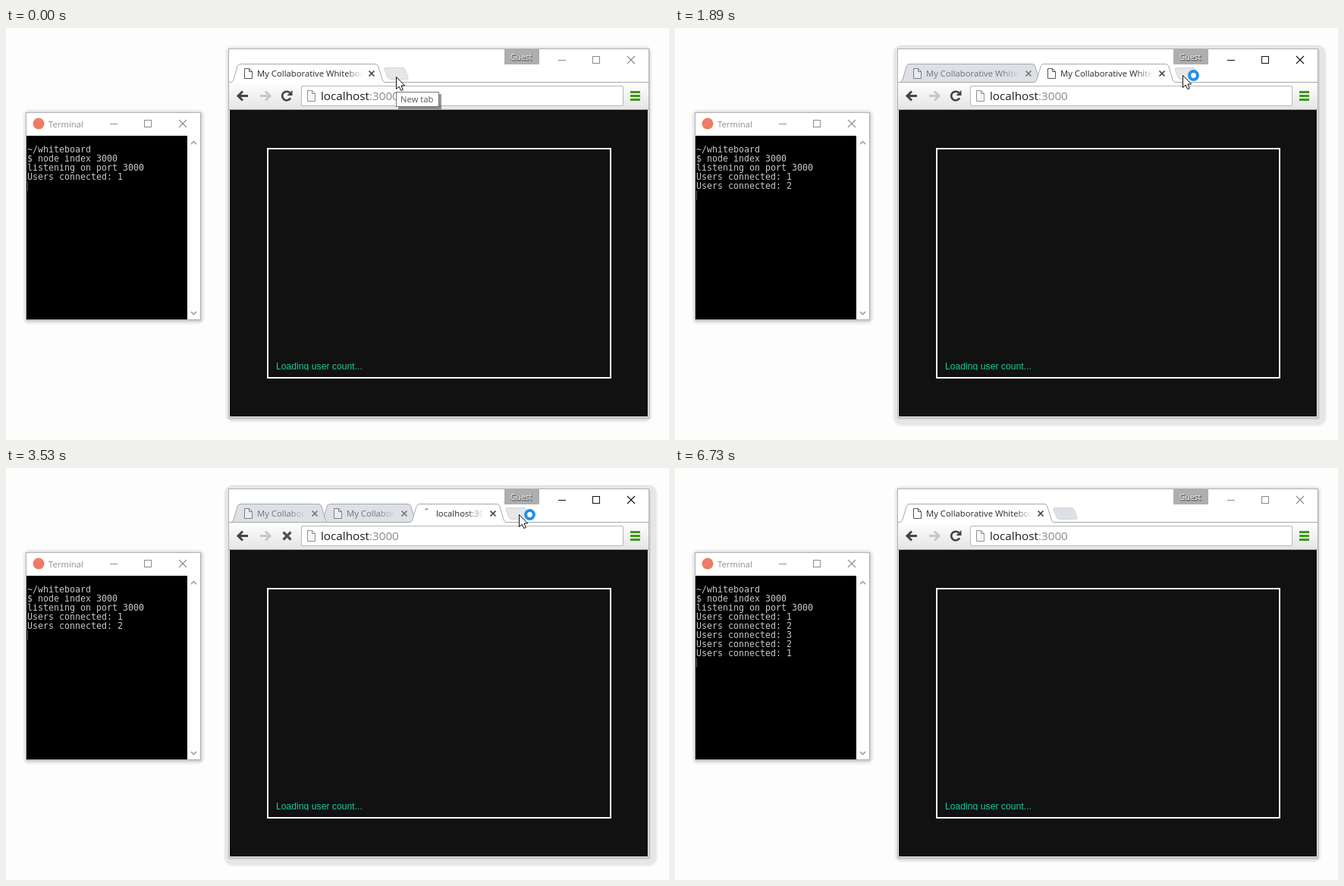
Recreate the animation shown at these times as an HTML page with a canvas. Size 874x543 px, loop 6.75 s.

```html
<!DOCTYPE html>
<html lang="en">
<head>
<meta charset="utf-8">
<title>Collaborative whiteboard demo</title>
<style>
html, body { margin: 0; width: 100%; height: 100%; overflow: hidden; background: #fdfdfd; }
canvas { display: block; }
</style>
</head>
<body>
<canvas width="874" height="543"></canvas>
<script>
const c = document.querySelector('canvas').getContext('2d');
const LOOP = 6750;
const SANS = '"Open Sans", "Noto Sans", sans-serif';
const MONO = '"DejaVu Sans Mono", monospace';
const ARIAL = '"Liberation Sans", Arial, sans-serif';
const PAGE_TITLE = 'My Collaborative Whiteboard';

// Moments of the story, in ms
const OPEN_2 = 310, URL_2 = 760, GO_2 = 1390, DONE_2 = 1600;
const OPEN_3 = 2310, URL_3 = 2750, GO_3 = 3380, DONE_3 = 3600;
const CLOSE_3 = 4520, CLOSE_2 = 5700, BLUR = 6730, SLIDE = 220;

// Left and right edge of three tabs, then the new-tab button
const ONE = [296, 500, 489, 500, 489, 500, 499];
const TWO = [296, 484, 473, 660, 649, 660, 659];
const THREE = [296, 425, 414, 543, 532, 660, 659];
const LAYOUTS = [[OPEN_2, TWO], [OPEN_3, THREE], [CLOSE_3, TWO], [CLOSE_2, ONE]];

// Pointer path: time, x, y
const PATH = [
  [330, 514, 64], [820, 631, 75], [1480, 631, 75], [1860, 669, 62], [1890, 669, 62],
  [2030, 676, 61], [3640, 676, 61], [3980, 668, 58], [4070, 668, 58], [4370, 643, 58],
  [4540, 643, 58], [4770, 613, 57], [5180, 647, 58], [5330, 647, 58], [5390, 646, 57],
  [5780, 646, 57], [6370, 805, 503], [6400, 805, 504], [6450, 819, 545]
];

// Lines added to the terminal: time, text
const LOG = [
  [0, '~/whiteboard'], [0, '$ node index 3000'], [0, 'listening on port 3000'],
  [0, 'Users connected: 1'], [1140, 'Users connected: 2'], [3620, 'Users connected: 3'],
  [4580, 'Users connected: 2'], [5760, 'Users connected: 1']
];

const within = (t, a, b) => t >= a && t < b;
const mix = (a, b, k) => a + (b - a) * k;
function ease(t, a, b) {
  const k = Math.min(1, Math.max(0, (t - a) / (b - a)));
  return k * k * (3 - 2 * k);
}

function pointerAt(t) {
  const i = PATH.findIndex(p => p[0] > t);
  if (i === 0) return PATH[0].slice(1);
  if (i < 0) return [819, 560];
  const a = PATH[i - 1], b = PATH[i], k = ease(t, a[0], b[0]);
  return [mix(a[1], b[1], k), mix(a[2], b[2], k)];
}

function layoutAt(t) {
  let now = ONE;
  for (const [start, next] of LAYOUTS) {
    const k = ease(t, start, start + SLIDE), from = now;
    now = from.map((v, i) => mix(v, next[i], k));
  }
  return now;
}

function rect(x, y, w, h, fill) {
  c.fillStyle = fill;
  c.fillRect(x, y, w, h);
}
function frame(x, y, w, h, color, width = 1) {
  c.strokeStyle = color;
  c.lineWidth = width;
  c.strokeRect(x, y, w, h);
}
function round(x, y, w, h, r, fill) {
  c.beginPath();
  c.roundRect(x, y, w, h, r);
  c.fillStyle = fill;
  c.fill();
}
function poly(points, { fill, stroke, width = 1, close = false }) {
  c.beginPath();
  for (let i = 0; i < points.length; i += 2) c.lineTo(points[i], points[i + 1]);
  if (close) c.closePath();
  paint(fill, stroke, width);
}
function paint(fill, stroke, width = 1) {
  if (fill) { c.fillStyle = fill; c.fill(); }
  if (stroke) { c.strokeStyle = stroke; c.lineWidth = width; c.stroke(); }
}
function circle(x, y, r, fill, stroke, width) {
  c.beginPath();
  c.arc(x, y, r, 0, 7);
  paint(fill, stroke, width);
}
function cross(x, y, r, color, width) {
  poly([x - r, y - r, x + r, y + r], { stroke: color, width });
  poly([x - r, y + r, x + r, y - r], { stroke: color, width });
}
function text(s, x, y, size, color, { font = SANS, weight = 400, align = 'left' } = {}) {
  c.font = `${weight} ${size}px ${font}`;
  c.textAlign = align;
  c.fillStyle = color;
  c.fillText(s, x, y);
  return x + c.measureText(s).width;
}

function pageIcon(x, y, color, fill, w = 10, h = 13) {
  const fold = x + w - 4;
  poly([x, y, fold, y, x + w, y + 4, x + w, y + h, x, y + h], { fill, stroke: color, close: true });
  poly([fold, y, fold, y + 4, x + w, y + 4], { stroke: color });
}
function searchIcon(x, y) {
  circle(x - 1, y - 1, 3.8, null, '#777', 2);
  poly([x + 2, y + 2, x + 6, y + 6], { stroke: '#777', width: 2.4 });
}
function windowButtons(x, y, color) {
  poly([x - 5, y + .5, x + 5, y + .5], { stroke: color });
  frame(x + 40.5, y - 4.5, 9, 9, color);
  cross(x + 91, y, 5, color, 1.1);
}

function drawTerminal(t) {
  round(22, 107, 240, 284, 9, '#f2f2f2');
  round(24, 109, 236, 280, 7, '#e6e6e6');
  round(26, 112, 232, 275, 3, '#d0d0d0');
  rect(26, 111, 231, 274, '#b0b0b0');
  rect(27, 112, 229, 272, '#fff');
  circle(43, 126, 7.5, '#ee7b66');
  text('Terminal', 56, 131, 11.3, '#8e8e8e');
  windowButtons(142, 126, '#8c8c8c');
  rect(27, 142, 212, 242, '#000');
  poly([244, 153, 247.5, 149.5, 251, 153], { stroke: '#aaa', width: 1.8 });
  poly([244, 374, 247.5, 377.5, 251, 374], { stroke: '#aaa', width: 1.8 });
  const lines = LOG.filter(l => t >= l[0]);
  lines.forEach((l, i) => text(l[1], 28, 164 + 12 * i, 11.63, '#c8c8c8', { font: MONO }));
  const y = 155 + 12 * lines.length;
  for (let i = 0; i < 12; i += 2) rect(28, y + i, 1, 1, '#aaa');
}

function tabPath(x, r) {
  c.beginPath();
  c.moveTo(x, 72);
  c.quadraticCurveTo(x + 3, 71, x + 4, 68);
  c.lineTo(x + 9, 51);
  c.quadraticCurveTo(x + 10, 47.5, x + 13, 47.5);
  c.lineTo(r - 13, 47.5);
  c.quadraticCurveTo(r - 10, 47.5, r - 9, 51);
  c.lineTo(r - 4, 68);
  c.quadraticCurveTo(r - 3, 71, r, 72);
}

function drawTab(t, i, x, r, active, mouse) {
  if (r - x < 26) return;
  tabPath(x, r);
  paint(active ? '#fff' : '#dde1e6', '#a6a8ab');
  if (r - x < 60) return;

  const [go, done] = [[-1, -1], [GO_2, DONE_2], [GO_3, DONE_3]][i];
  const title = t < go ? 'New Tab' : t < done ? 'localhost:3000' : PAGE_TITLE;
  if (t >= done) {
    pageIcon(x + 18.5, 53.5, active ? '#555' : '#7b7f85', active ? '#fff' : '#e9ecef');
  } else if (t >= go) {
    const a = (t - go) / 140 + 3;
    c.beginPath();
    c.arc(x + 24, 60, 6, a, a + .7);
    paint(null, '#888', 1.5);
  }
  const end = r - 30, rgb = active ? '40,40,40' : '112,116,122';
  const fade = c.createLinearGradient(end - 22, 0, end, 0);
  fade.addColorStop(0, `rgb(${rgb})`);
  fade.addColorStop(1, `rgba(${rgb},0)`);
  text(title, x + (t < go ? 15 : 35), 64, 11.3, fade);

  const hover = Math.hypot(mouse[0] - r + 18, mouse[1] - 60) < 7;
  if (hover) circle(r - 18, 60, 7, '#d9483b');
  cross(r - 18, 60, 3.5, hover ? '#fff' : active ? '#444' : '#777', 1.7);
}

function drawTabs(t, mouse) {
  const L = layoutAt(t), b = L[6];
  const active = within(t, OPEN_3, CLOSE_3) ? 2 : within(t, OPEN_2, CLOSE_2) ? 1 : 0;
  const hover = mouse[0] > b + 2 && mouse[0] < b + 30 && mouse[1] > 51 && mouse[1] < 69;
  c.beginPath();
  c.moveTo(b + 2, 52.5);
  c.lineTo(b + 24, 52.5);
  c.quadraticCurveTo(b + 26, 52.5, b + 27, 55);
  c.lineTo(b + 31, 65);
  c.quadraticCurveTo(b + 32, 67.5, b + 29, 67.5);
  c.lineTo(b + 8, 67.5);
  c.quadraticCurveTo(b + 5, 67.5, b + 4, 65);
  c.lineTo(b, 55);
  c.quadraticCurveTo(b - 1, 52.5, b + 2, 52.5);
  paint(hover ? '#e5e6e8' : '#dde1e6', '#d3d6da');

  const tab = i => drawTab(t, i, L[2 * i], L[2 * i + 1], i === active, mouse);
  for (const i of [2, 1, 0]) if (i !== active) tab(i);
  rect(294, 71, 553, 1, '#a6a8ab');
  tab(active);
}

function drawToolbar(t, blank, typed) {
  const shade = c.createLinearGradient(0, 72, 0, 107);
  shade.addColorStop(0, '#fefefe');
  shade.addColorStop(1, '#e5e5e5');
  rect(294, 72, 553, 35, shade);
  rect(294, 107, 553, 1, '#a9a9a9');

  const arrow = (x, d, color) => {
    poly([x, 89.5, x + 14 * d, 89.5], { stroke: color, width: 3 });
    poly([x + 7 * d, 83.5, x + d, 89.5, x + 7 * d, 95.5], { stroke: color, width: 3 });
  };
  arrow(305, 1, blank ? '#c3c3c3' : '#444');
  arrow(349, -1, '#c6c6c6');

  if (within(t, GO_2, DONE_2) || within(t, GO_3, DONE_3)) {
    cross(370.5, 89.5, 5, '#505050', 3.2);
  } else {
    c.beginPath();
    c.arc(370, 89.5, 5.8, .5, 5.5);
    paint(null, '#444', 2.6);
    poly([377.5, 82, 377.5, 89, 370.5, 89], { fill: '#444', close: true });
  }

  round(389, 76, 425, 27, 2, '#b8b8b8');
  round(390, 77, 423, 25, 1, '#fff');
  if (blank && !typed) {
    searchIcon(402, 88);
  } else {
    pageIcon(397.5, 82.5, '#909090', '#f6f6f6', 10, 14);
    let x = 415;
    if (typed) x = text('http://', x, 95, 15.25, '#888');
    x = text('localhost', x, 95, 15.25, '#1c1c1c');
    text(typed ? ':3000/' : ':3000', x, 95, 15.25, '#888');
  }
  for (const y of [83, 88, 93]) rect(823, y, 13, 3, '#3c9a16');
}

function drawGuestPage() {
  text('You’re browsing as a Guest', 571, 222, 22.6, '#222', { weight: 300, align: 'center' });
  [
    'Pages you view in this window won’t appear in the browser',
    'history and they won’t leave other traces, like cookies, on the',
    'computer after you close all open Guest windows. Any files you',
    'download will be preserved, however.'
  ].forEach((s, i) => text(s, 395.5, 274 + 18 * i, 11.4, '#1c1c1c'));
  text('LEARN MORE', 532, 370, 12.4, '#4a68d0');
}

function drawSuggestions() {
  rect(294, 108, 553, 62, '#fff');
  rect(294, 170, 553, 1, '#b0b0b0');
  rect(294, 171, 553, 2, '#eee');
  rect(390, 111, 423, 28, '#3399ff');
  pageIcon(397.5, 117.5, '#fff', null, 10, 14);
  text('http://localhost:3000', 415, 131, 15.3, '#74f7c0', { weight: 700 });
  searchIcon(402, 152);
  text('http://localhost:3000/', 415, 159, 15.25, '#1c1c1c');
  text('- Vanook Search', 573, 159, 15.25, '#888');
}

function drawBoard() {
  rect(295, 108, 551, 404, '#111');
  frame(345, 159, 452, 302, '#fff', 2);
  c.save();
  c.beginPath();
  c.rect(346, 430, 450, 21);
  c.clip();
  text('Loading user count...', 356, 450, 12.2, '#14cc9e', { font: ARIAL });
  c.restore();
}

function drawBrowser(t, mouse) {
  const focused = within(t, OPEN_2, BLUR);
  const blank = within(t, OPEN_2, GO_2) || within(t, OPEN_3, GO_3);
  const typed = within(t, URL_2, GO_2) || within(t, URL_3, GO_3);
  if (focused) {
    round(287, 22, 572, 503, 12, '#f0f0f0');
    round(289, 23, 568, 500, 10, '#e6e6e6');
    round(293, 28, 557, 488, 3, '#d2d2d2');
  } else {
    round(289, 23, 563, 497, 9, '#f2f2f2');
    round(291, 25, 559, 493, 7, '#e6e6e6');
    round(293, 28, 556, 488, 3, '#d0d0d0');
  }
  rect(293, 27, 555, 487, '#b0b0b0');
  rect(294, 28, 553, 485, '#fff');

  drawTabs(t, mouse);
  rect(657, 28, 46, 20, '#aeaeae');
  c.lineJoin = 'round';
  c.font = `10.4px ${SANS}`;
  c.textAlign = 'center';
  c.strokeStyle = '#777';
  c.lineWidth = 1.4;
  c.strokeText('Guest', 679.5, 42.5);
  text('Guest', 679, 42, 10.4, '#fff', { align: 'center' });
  c.lineJoin = 'miter';
  windowButtons(733, 42, focused ? '#111' : '#8a8a8a');

  drawToolbar(t, blank, typed);
  if (blank) drawGuestPage(); else drawBoard();
  if (typed) drawSuggestions();

  if (t < OPEN_2) {
    rect(517, 87, 57, 20, 'rgba(0,0,0,.4)');
    rect(514, 84, 57, 20, '#fff');
    frame(514.5, 84.5, 56, 19, '#767676');
    text('New tab', 520, 98, 11.3, '#575757');
  }
}

function drawPointer(t, [x, y]) {
  c.save();
  c.translate(Math.round(x) + .5, Math.round(y) + .5);
  poly([0, 0, 0, 16, 3.7, 12.6, 6.2, 18, 8.8, 17, 6.5, 11.5, 11.2, 11.5],
    { fill: '#fff', stroke: '#111', close: true });
  if (within(t, 350, 3700)) circle(14, 0, 5.4, '#fff', '#2190ea', 4);
  c.restore();
}

function draw(t) {
  const mouse = pointerAt(t);
  rect(0, 0, 874, 543, '#fdfdfd');
  drawTerminal(t);
  drawBrowser(t, mouse);
  drawPointer(t, mouse);
}

function tick() {
  draw(performance.now() % LOOP);
  requestAnimationFrame(tick);
}
tick();
</script>
</body>
</html>
```
